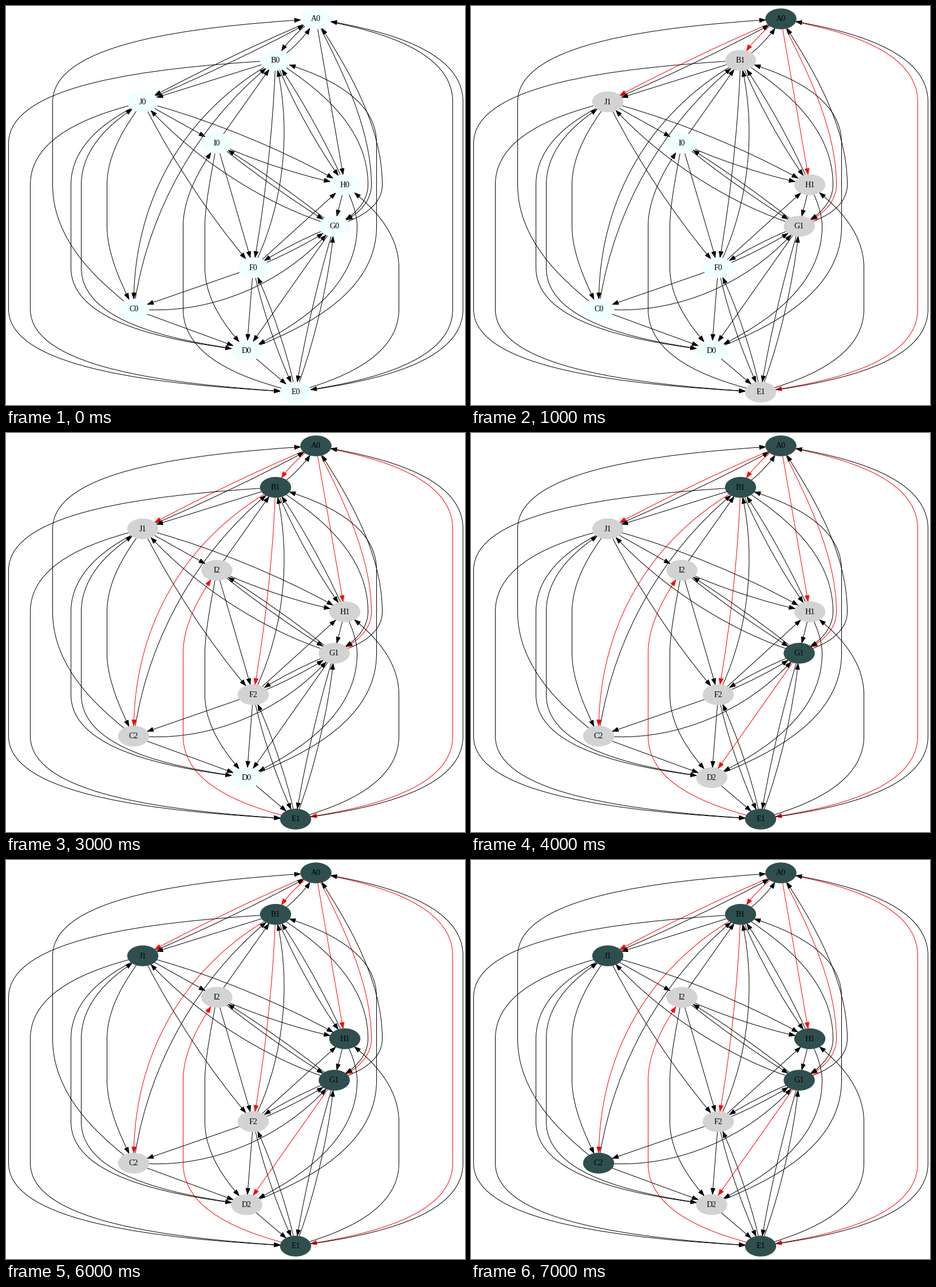
A matplotlib script that plays this animation: 802x698 px, repeating every 8000 ms.

```python
import numpy as np
import matplotlib.pyplot as plt
from matplotlib.animation import FuncAnimation
from matplotlib.patches import Ellipse, PathPatch, Polygon
from matplotlib.path import Path

W, H, DPI = 802, 698, 64
PX = 72 / DPI  # one pixel in points
RX, RY = 27.2, 18.2
FRESH, QUEUED, DONE = "#f0ffff", "#d3d3d3", "#2f4f4f"

# One node per rank, from top to bottom.
ORDER = "ABJIHGFCDE"
COLUMNS = (541, 470.5, 238.5, 368, 591.5, 573, 431.5, 222.5, 420, 505.5)

STRAIGHT = "AH BJ CD DE FC FD FH GD HG IB IF JI"
# Sideways pull of a curved edge in pixels, positive to the east.
BOWS = dict(AB=-7, BA=7, AJ=-5, JA=5, BC=-92, CB=-62, BF=8, FB=40,
            BH=-9, HB=7, CG=58, EF=8, FE=-8, EG=12, GE=-6, FG=5, GF=-5,
            GI=5, IG=-5, GJ=-33, IH=-8, JF=-13, JH=15)
# Edges that detour to a vertical lane at x, by default two ranks inside.
LANES = dict(AE=780, EA=798, BE=4, JE=42, EH=686, EI=309, ID=347, JC=176,
             JD=113, DJ=131, CA=81, AG=638, BG=632, GA=657, DB=647, HD=613)
SPANS = dict(CA=(2, 4), AG=(4, 4), BG=(4, 4), GA=(4, 4), DB=(3, 5), HD=(5, 5))


def rank_y(rank):
    return 22 + 72.55 * rank


nodes = {name: np.array([x, rank_y(i)])
         for i, (name, x) in enumerate(zip(ORDER, COLUMNS))}


def rim(name, toward):
    """Point on a node's outline in the direction of another point."""
    d = toward - nodes[name]
    return nodes[name] + d / np.hypot(d[0] / RX, d[1] / RY)


def bow(name, pull):
    """Single Bezier piece pulled sideways from the chord."""
    a, b = nodes[name[0]], nodes[name[1]]
    dx, dy = (b - a) * np.sign(b[1] - a[1])
    shift = pull * np.array([dy, -dx]) / np.hypot(dx, dy)
    c1, c2 = a + (b - a) / 3 + shift, b + (a - b) / 3 + shift
    return [rim(name[0], c1), c1, c2, rim(name[1], c2)]


def swing(name, x, y):
    """Bezier piece from a node to a vertical lane; steeper if close."""
    centre = nodes[name]
    dx, dy = x - centre[0], y - centre[1]
    steep = abs(dy) / (abs(dx) + abs(dy))
    c1 = centre + (0.45 * dx, 0.4 * steep * dy)
    c2 = np.array([x, y - (0.9 - 0.75 * steep) * dy])
    return [rim(name, c1), c1, c2, np.array([x, y])]


def lane(name, x):
    ranks = [ORDER.index(n) for n in name]
    top, bottom = SPANS.get(name, (min(ranks) + 2, max(ranks) - 2))
    if ranks[0] > ranks[1]:
        top, bottom = bottom, top
    return swing(name[0], x, rank_y(top)) + swing(name[1], x, rank_y(bottom))[::-1]


def arrow(pts):
    codes = [Path.MOVETO] + [Path.CURVE4] * 3
    if len(pts) > 4:
        codes += [Path.LINETO] + [Path.CURVE4] * 3
    line = PathPatch(Path(pts, codes), fill=False, lw=PX, zorder=2)
    tip = pts[-1]
    u = (tip - pts[-2]) / np.hypot(*(tip - pts[-2]))
    side = 3.6 * np.array([-u[1], u[0]])
    base = tip - 10.2 * u
    head = Polygon([tip, base + side, base - side], lw=PX, zorder=2)
    return ax.add_patch(line), ax.add_patch(head)


fig = plt.figure(figsize=(W / DPI, H / DPI), dpi=DPI, facecolor="white")
ax = fig.add_axes([0, 0, 1, 1])
ax.set_xlim(-0.5, W - 0.5)
ax.set_ylim(H - 0.5, -0.5)
ax.axis("off")

routes = {name: bow(name, 0) for name in STRAIGHT.split()}
routes.update((name, bow(name, pull)) for name, pull in BOWS.items())
routes.update((name, lane(name, x)) for name, x in LANES.items())
edges = {name: arrow(routes[name]) for name in sorted(routes)}

ovals, labels = {}, {}
for name, (x, y) in nodes.items():
    ovals[name] = ax.add_patch(Ellipse((x, y), 2 * RX, 2 * RY, lw=0, zorder=1))
    labels[name] = ax.text(x, y + 4, "", family="Liberation Serif",
                           size=14 * PX, ha="center", va="baseline", zorder=3)


def search(steps):
    """Breadth-first search from A, stopped after some expanded nodes."""
    depth, tree, queue = {"A": 0}, set(), ["A"]
    for i in range(steps):
        here = queue[i]
        for name in edges:
            if name[0] == here and name[1] not in depth:
                depth[name[1]] = depth[here] + 1
                tree.add(name)
                queue.append(name[1])
    return depth, tree, queue[:steps]


def draw(step):
    depth, tree, done = search(step)
    for name, oval in ovals.items():
        seen = step > 0 and name in depth
        oval.set_facecolor(DONE if name in done else QUEUED if seen else FRESH)
        labels[name].set_text(f"{name}{depth.get(name, 0)}")
    for name, (line, head) in edges.items():
        color = "red" if name in tree else "black"
        line.set_edgecolor(color)
        head.set_color(color)
    return []


anim = FuncAnimation(fig, draw, frames=8, interval=1000, repeat=True,
                     repeat_delay=0, blit=False)
plt.show()
```
